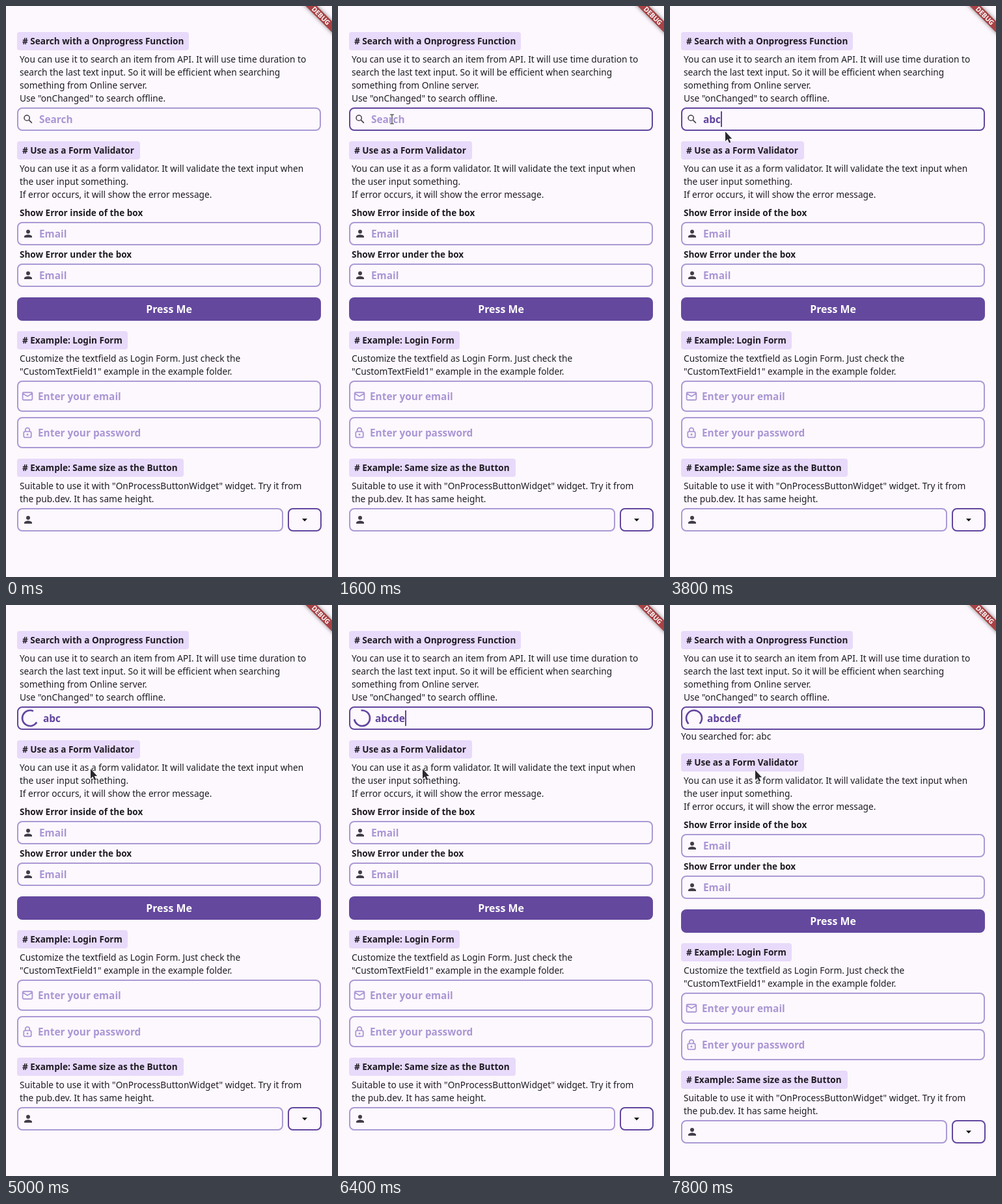
Write an HTML page with a canvas that moves like this. It is 501 px wide and 878 px high and loops after 8 s.

```html
<!DOCTYPE html>
<html lang="en">
<head>
<meta charset="utf-8">
<title>Text field demo</title>
<style>
html, body { margin: 0; width: 100%; height: 100%; overflow: hidden; background: #fcf8fd; }
canvas { display: block; width: 501px; height: 878px; }
</style>
</head>
<body>
<canvas id="stage"></canvas>
<script>
const W = 501, H = 878, LOOP = 8000, STEP = 200;
const canvas = document.getElementById('stage');
const ctx = canvas.getContext('2d');
const dpr = window.devicePixelRatio || 1;
canvas.width = W * dpr;
canvas.height = H * dpr;

const BG = '#fcf8fd', INK = '#1f1c23', DEEP = '#62459f', SOFT = '#ab99d5',
      HINT = '#ab96d5', TAG = '#e8dafa', ICON = '#423d49';
const FAMILY = '"Noto Sans", "Open Sans", sans-serif';
const BODY = `13.72px ${FAMILY}`, BOLD = `bold 13.55px ${FAMILY}`, INPUT = `bold 15.4px ${FAMILY}`;

const SPIN_FROM = 4470, RESULT_AT = 6600, FOCUS_AT = 1200;
const typed = [[2200, 'a'], [2800, 'ab'], [3600, 'abc'], [5600, 'abcd'], [6200, 'abcde'], [7200, 'abcdef']];
const caretOn = [[1200, 1500], [2200, 2600], [2800, 3400], [3600, 4900], [5400, 6700], [7200, 7700]];
const pointer = [[800, 8, 232], [1000, 48, 200], [1200, 83, 174], [3400, 83, 174], [3800, 85, 193],
                 [4000, 98, 211], [4200, 98, 211], [4600, 130, 252], [6400, 130, 252], [6600, 131, 254]];

function text(str, x, y, font = BODY, color = INK, align = 'left') {
  ctx.font = font;
  ctx.fillStyle = color;
  ctx.textAlign = align;
  ctx.fillText(str, x, y);
}

function box(x, y, w, h, r) {
  ctx.beginPath();
  ctx.roundRect(x, y, w, h, r);
}

function fill(color) { ctx.fillStyle = color; ctx.fill(); }

function stroke(color, width) {
  ctx.strokeStyle = color;
  ctx.lineWidth = width;
  ctx.stroke();
}

function field(y, h, color = SOFT, x = 17, w = 467) {
  box(x + 1, y + 1, w - 2, h - 2, 7);
  stroke(color, 2);
}

function tag(str, y, w) {
  box(17, y, w, 28, 4);
  fill(TAG);
  text(str, 25, y + 19, BOLD);
}

function lines(y, ...rows) {
  rows.forEach((row, i) => text(row, 21, y + 5 + i * 20));
}

// Icons are drawn on a 24-unit grid centred on x, y.
function icon(x, y, scale, draw) {
  ctx.save();
  ctx.translate(x, y);
  ctx.scale(scale, scale);
  ctx.translate(-12, -12);
  ctx.beginPath();
  draw();
  ctx.restore();
}

function lens(x, y) {
  icon(x, y, 0.75, () => {
    ctx.arc(9.5, 9.5, 5.5, 0, 7);
    ctx.moveTo(13.8, 13.8);
    ctx.lineTo(19.8, 19.8);
    stroke(ICON, 2);
  });
}

function person(y) {
  icon(34, y, 0.75, () => {
    ctx.arc(12, 8, 4, 0, 7);
    fill(ICON);
    ctx.fill(new Path2D('M12 14c-2.67 0-8 1.34-8 4v2h16v-2c0-2.66-5.33-4-8-4z'));
  });
}

function mail(y) {
  icon(33, y, 0.82, () => {
    ctx.roundRect(3, 5, 18, 14, 1.8);
    ctx.moveTo(3.5, 7);
    ctx.lineTo(12, 12.3);
    ctx.lineTo(20.5, 7);
    stroke(HINT, 2.2);
  });
}

function lock(y) {
  icon(33, y + 0.5, 0.82, () => {
    ctx.roundRect(5, 9.5, 14, 11, 2.4);
    ctx.moveTo(8, 9.5);
    ctx.lineTo(8, 6.5);
    ctx.arc(12, 6.5, 4, Math.PI, 0);
    ctx.lineTo(16, 9.5);
    stroke(HINT, 2.2);
    ctx.beginPath();
    ctx.arc(12, 15, 1.8, 0, 7);
    fill(HINT);
  });
}

function banner() {
  ctx.save();
  ctx.translate(484, 15);
  ctx.rotate(Math.PI / 4);
  ctx.shadowColor = 'rgba(0,0,0,.5)';
  ctx.shadowBlur = 6 * dpr;
  ctx.fillStyle = '#a94245';
  ctx.fillRect(-45, -6, 90, 12);
  ctx.shadowColor = 'transparent';
  text('DEBUG', 0, 3.7, `900 10.2px ${FAMILY}`, '#fff', 'center');
  ctx.restore();
}

// Fast-out-slow-in, cubic-bezier(.4, 0, .2, 1).
function ease(x) {
  x = Math.min(1, Math.max(0, x));
  let lo = 0, hi = 1;
  for (let i = 0; i < 20; i++) {
    const s = (lo + hi) / 2, r = 1 - s;
    if (1.2 * r * r * s + 0.6 * r * s * s + s * s * s < x) lo = s; else hi = s;
  }
  return 3 * (1 - lo) * lo * lo + lo ** 3;
}

function spinner(u) {
  const phase = u / 1333 % 1, turn = u / 2222 % 1;
  const head = ease(phase * 2), tail = ease(phase * 2 - 1);
  const from = Math.PI * (-0.5 + 1.5 * tail + 2 * turn + 0.5 * phase);
  const sweep = Math.max(Math.PI * 1.5 * (head - tail), 0.001);
  ctx.beginPath();
  ctx.arc(37, 174, 12, from, from + sweep);
  stroke(DEEP, 2.6);
}

function searchField(t) {
  const loading = t >= SPIN_FROM;
  field(156, 36, t >= FOCUS_AT ? DEEP : SOFT);
  if (loading) spinner(t - SPIN_FROM); else lens(34, 174);

  const x = loading ? 57 : 51;
  const value = typed.reduce((last, [at, str]) => t >= at ? str : last, '');
  if (value) text(value, x, 180, INPUT, DEEP);
  else text('Search', x, 180, INPUT, HINT);

  if (caretOn.some(([a, b]) => t >= a && t < b)) {
    ctx.font = INPUT;
    ctx.fillStyle = DEEP;
    ctx.fillRect(Math.round(x + ctx.measureText(value).width), 162, 2, 24);
  }
}

function page(t) {
  tag('# Search with a Onprogress Function', 40, 264);
  lines(82, 'You can use it to search an item from API. It will use time duration to',
    'search the last text input. So it will be efficient when searching',
    'something from Online server.', 'Use "onChanged" to search offline.');
  searchField(t);

  ctx.save();
  if (t >= RESULT_AT) {
    text('You searched for: abc', 17, 207);
    ctx.translate(0, 20);
  }
  tag('# Use as a Form Validator', 208, 189);
  lines(250, 'You can use it as a form validator. It will validate the text input when',
    'the user input something.', 'If error occurs, it will show the error message.');
  [['inside of', 318], ['under', 382]].forEach(([where, y]) => {
    text(`Show Error ${where} the box`, 21, y + 5, BOLD);
    field(y + 14, 36);
    person(y + 32);
    text('Email', 51, y + 38, INPUT, HINT);
  });

  box(17, 448, 467, 36, 8);
  fill('#64489e');
  text('Press Me', 250.5, 472, `bold 15.9px ${FAMILY}`, '#fff', 'center');

  tag('# Example: Login Form', 500, 170);
  lines(542, 'Customize the textfield as Login Form. Just check the',
    '"CustomTextField1" example in the example folder.');
  field(576, 48);
  mail(600);
  text('Enter your email', 49, 606, INPUT, HINT);
  field(632, 48);
  lock(656);
  text('Enter your password', 49, 662, INPUT, HINT);

  tag('# Example: Same size as the Button', 696, 256);
  lines(738, 'Suitable to use it with "OnProcessButtonWidget" widget. Try it from',
    'the pub.dev. It has same height.');
  field(772, 36, SOFT, 17, 409);
  person(790);
  field(772, 36, DEEP, 433, 52);
  ctx.beginPath();
  ctx.moveTo(455, 788.3);
  ctx.lineTo(463, 788.3);
  ctx.lineTo(459, 792.5);
  fill('#111');
  ctx.restore();
}

function beam(x, y) {
  ctx.beginPath();
  ctx.moveTo(x - 3, y - 7);
  ctx.lineTo(x + 3, y - 7);
  ctx.moveTo(x, y - 7);
  ctx.lineTo(x, y + 7);
  ctx.moveTo(x - 3, y + 7);
  ctx.lineTo(x + 3, y + 7);
  stroke('#fff', 2.4);
  stroke('#222', 1.1);
}

function arrow(x, y) {
  ctx.save();
  ctx.translate(x, y);
  const shape = new Path2D('M0 0V15L3.4 11.8 6 17.6 8.4 16.5 5.8 10.9H10.2Z');
  ctx.strokeStyle = '#fff';
  ctx.lineWidth = 1.2;
  ctx.stroke(shape);
  ctx.fillStyle = '#2b2930';
  ctx.fill(shape);
  ctx.restore();
}

function mouse(t) {
  if (t < pointer[0][0]) return;
  const next = pointer.findIndex(p => p[0] > t);
  const b = pointer[next < 0 ? pointer.length - 1 : next];
  const a = next < 0 ? b : pointer[next - 1];
  const k = a === b ? 0 : (t - a[0]) / (b[0] - a[0]);
  const x = a[1] + (b[1] - a[1]) * k, y = a[2] + (b[2] - a[2]) * k;
  if (y > 156 && y < 186) beam(x, y); else arrow(x, y);
}

function frame(now) {
  // The picture advances in steps of 200 ms.
  const t = Math.floor(now % LOOP / STEP) * STEP;
  ctx.setTransform(dpr, 0, 0, dpr, 0, 0);
  ctx.fillStyle = BG;
  ctx.fillRect(0, 0, W, H);
  page(t);
  banner();
  mouse(t);
  requestAnimationFrame(frame);
}
requestAnimationFrame(frame);
</script>
</body>
</html>
```
